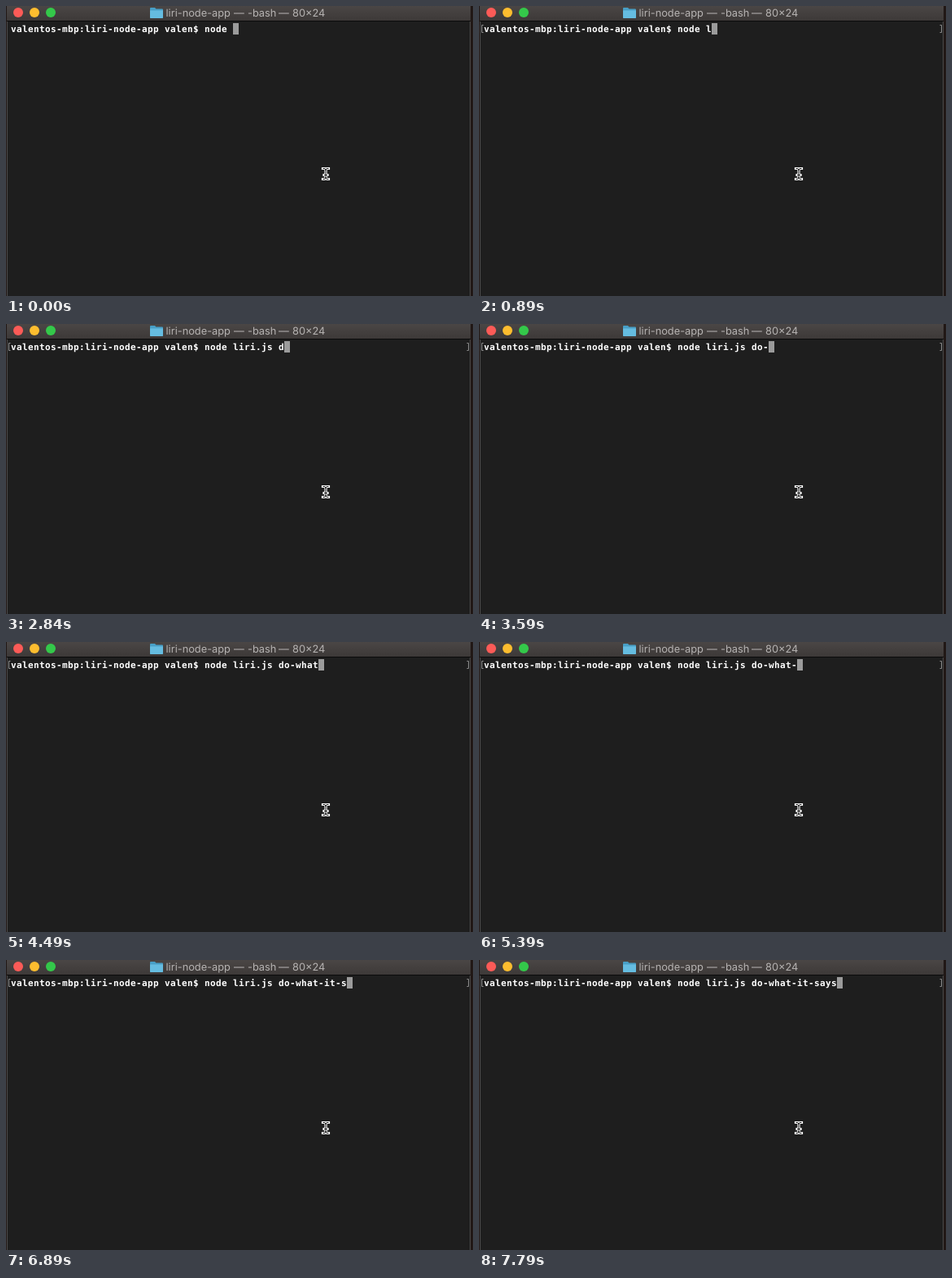
An HTML page that plays this animation: 574 px wide and 356 px high, repeating every 8 s.

```html
<!DOCTYPE html>
<html lang="en">
<head>
<meta charset="utf-8">
<title>Terminal</title>
<style>
  html, body { margin: 0; width: 100%; height: 100%; overflow: hidden; background: #1e1e1e; }
  svg { display: block; }
  text { white-space: pre; text-rendering: geometricPrecision; }
  .title { font: 12.8px Inter, "Open Sans", sans-serif; fill: #b6b3b2; }
  .line { font: bold 11px "DejaVu Sans Mono", monospace; fill: #fff; }
</style>
</head>
<body>
<svg width="574" height="356" viewBox="0 0 574 356">
  <defs>
    <linearGradient id="bar" x2="0" y2="1">
      <stop stop-color="#4a4645"/>
      <stop offset="1" stop-color="#3d3938"/>
    </linearGradient>
    <path id="beam" fill="none" d="M389.5 199.5H391Q393 199.5 393 202V210Q393 212.5 391 212.5H389.5M396.5 199.5H395Q393 199.5 393 202M393 210Q393 212.5 395 212.5H396.5M391 207.5H395"/>
  </defs>

  <!-- Window -->
  <rect width="574" height="356" fill="#1e1e1e"/>
  <path d="M0 0H1V356H0ZM571 0H574V356H571Z" fill="#211816"/>
  <path d="M1 18H2V356H1ZM570 18H571V356H570Z" fill="#4b4a4a"/>
  <rect x="1" width="570" height="18" fill="url(#bar)"/>
  <rect x="1" y="18" width="570" height="1" fill="#0b0b0b"/>
  <circle cx="15" cy="8" r="6" fill="#fc5b57"/>
  <circle cx="35" cy="8" r="6" fill="#fdbd2f"/>
  <circle cx="55" cy="8" r="6" fill="#34c84a"/>

  <!-- Title -->
  <path d="M177 3Q177 2 178 2H183L184.5 3.5H192Q193 3.5 193 4.5V14Q193 15 192 15H178Q177 15 177 14Z" fill="#489fc6"/>
  <path d="M177 5.5H193V14Q193 15 192 15H178Q177 15 177 14Z" fill="#65bce0"/>
  <g class="title">
    <text x="196.5" y="13">liri-node-app</text>
    <text x="280" y="13">—</text>
    <text x="297" y="13">-bash</text>
    <text x="335" y="13">—</text>
    <text x="352" y="13">80×24</text>
  </g>

  <!-- Command line -->
  <path id="marks" d="M5.5 23.5H3.5V32.5H5.5M566.5 23.5H568.5V32.5H566.5" fill="none" stroke="#8c8c8c"/>
  <rect id="caret" y="21" width="7" height="14" fill="#9b9b9b"/>
  <text id="line" class="line" y="32"></text>

  <use href="#beam" stroke="#fff" stroke-width="3.2" stroke-linecap="square"/>
  <use href="#beam" stroke="#111" stroke-width="1"/>
</svg>
<script>
  const LOOP = 8000, LEFT = 6, CELL = 7;
  const prompt = "valentos-mbp:liri-node-app valen$ node ";
  const typed = "liri.js do-what-it-says";
  // One time per key; the rest of the file name is completed at once.
  const keys = [890, 1040, ...Array(6).fill(1340), 2840, 2990, 3590, 3740, 3890, 4040,
    4490, 5390, 5840, 5990, 6590, 6890, 7040, 7190, 7790];
  const [line, caret, marks] = ["line", "caret", "marks"].map(id => document.getElementById(id));
  const cellX = i => LEFT + CELL * i;
  let shown = -1;

  function draw(now) {
    const t = now % LOOP;
    const count = keys.filter(k => k <= t).length;
    marks.style.display = t < 150 ? "none" : "";
    if (count !== shown) {
      const text = prompt + typed.slice(0, count);
      line.setAttribute("x", [...text].map((_, i) => cellX(i)).join(" "));
      line.textContent = text;
      caret.setAttribute("x", cellX(text.length));
      shown = count;
    }
  }

  const start = performance.now();
  function tick() {
    draw(performance.now() - start);
    requestAnimationFrame(tick);
  }
  tick();
</script>
</body>
</html>
```
